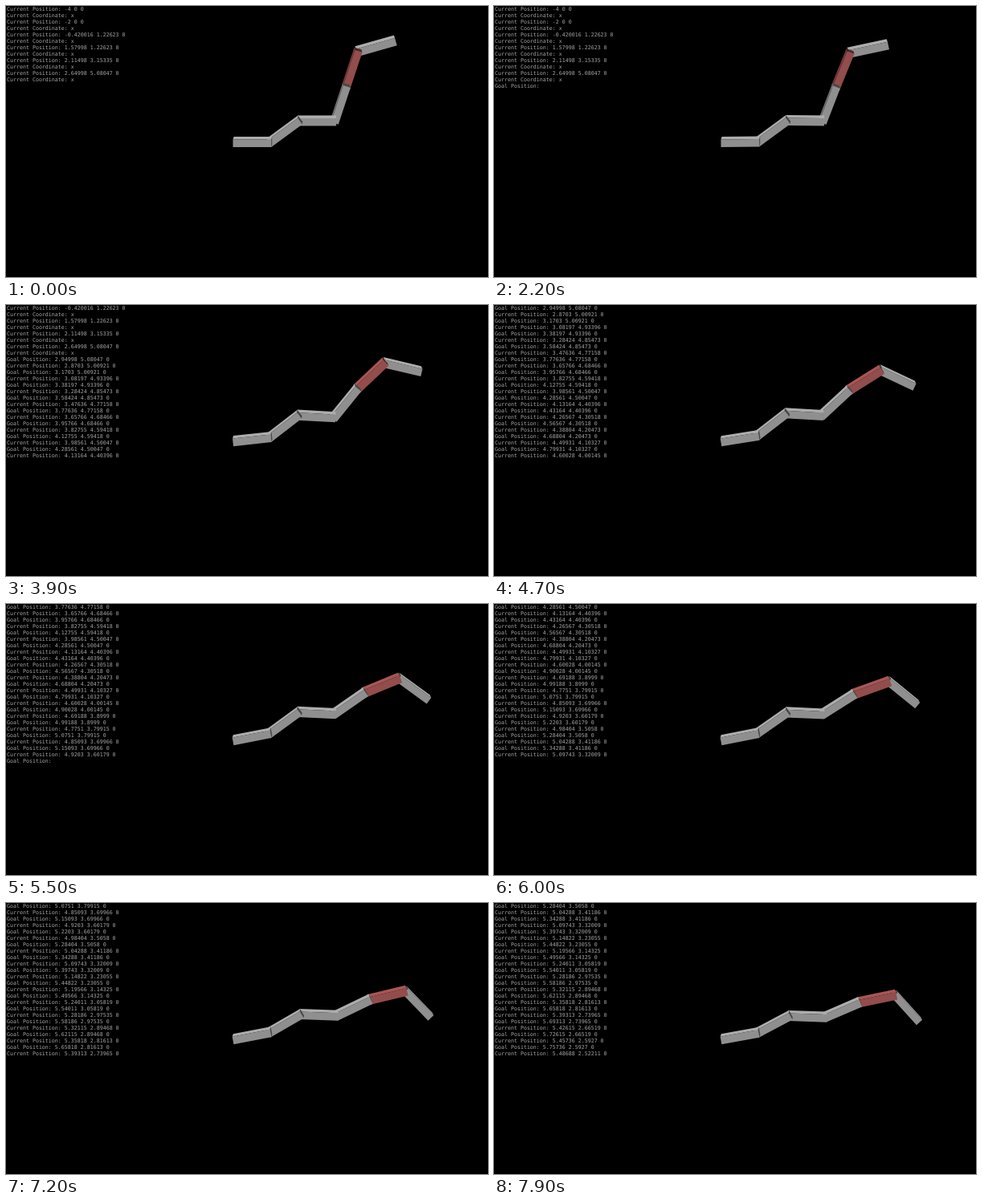
Animation of 600x338 px, one loop 8 s. Source, as an HTML page with a canvas:

```html
<!DOCTYPE html>
<html lang="en">
<head>
<meta charset="utf-8">
<title>Arm reaching for its goal</title>
<style>
html, body { margin: 0; width: 100%; height: 100%; overflow: hidden; background: #000; }
canvas, pre, #cursor { position: absolute; left: 0; top: 0; }
pre {
  margin: 0; left: 1px; color: #a6a6a6;
  font: 6.644px/8px "DejaVu Sans Mono", "Liberation Mono", monospace;
}
#cursor { left: 1.5px; top: 102.5px; width: 4px; height: 1.5px; background: #aaa; }
</style>
</head>
<body>
<canvas id="stage" width="600" height="338"></canvas>
<pre id="log"></pre>
<div id="cursor"></div>
<script>
const LOOP = 8000, ROWS = 25, STEPS = 29, LINK = 2, REACH = 0.3;
const DAMPING = 5.78, GAIN = 0.981;
const ctx = document.getElementById('stage').getContext('2d');
const log = document.getElementById('log');
const cursor = document.getElementById('cursor');

// Forward kinematics: world positions of the joints, then the tip
function jointsOf(bends) {
  let x = -4, y = 0, angle = 0;
  const joints = [[x, y]];
  for (const bend of bends) {
    angle += bend;
    x += LINK * Math.cos(angle);
    y += LINK * Math.sin(angle);
    joints.push([x, y]);
  }
  return joints;
}

// One damped least squares step of the wrist (joint 5) towards +x
function reach(bends) {
  const joints = jointsOf(bends), [wx, wy] = joints[5];
  const arms = joints.slice(0, 5).map(([x, y]) => [wx - x, wy - y]);
  const sum = f => arms.reduce((s, [x, y]) => s + f(x, y), 0);
  const a = sum((x, y) => y * y) + DAMPING;
  const b = sum((x, y) => -x * y);
  const c = sum(x => x * x) + DAMPING;
  const k = GAIN * REACH / (a * c - b * b);
  return bends.map((bend, i) => i < 5 ? bend - arms[i][1] * c * k - arms[i][0] * b * k : bend);
}

const poses = [[0, 0.66, -0.66, 1.3, 0, -1.02]];
while (poses.length <= STEPS) poses.push(reach(poses[poses.length - 1]));

const num = v => String(+v.toPrecision(6));
const place = (name, [x, y]) => `${name} Position: ${num(x)} ${num(y)} 0`;
const lines = jointsOf(poses[0]).slice(0, 6)
  .flatMap(p => [place('Current', p), 'Current Coordinate: x']);
const intro = lines.length;
for (let k = 1; k <= STEPS; k++) {
  const [x, y] = jointsOf(poses[k - 1])[5];
  lines.push(place('Goal', [x + REACH, y]), place('Current', jointsOf(poses[k])[5]));
}

// Solver steps finished at a time; slower at first
function progress(t) {
  const p = t < 3355 ? 1 + (t - 2240) / 279 : 5 + (t - 3355) / 180.5;
  return Math.min(STEPS, Math.max(0, p));
}

// World to stage; higher parts lie nearer to the camera
function project([x, y]) {
  const near = 1 / (1 - 0.0078 * y);
  return [284 + 22.3 * (x + 4) * near, 171.2 - 21.4 * y * near];
}

const grey = { front: '#8f8f8f', top: '#adadad', side: '#6e6e6e', cap: '#484848' };
const red = { front: '#924d4c', top: '#a95655', side: '#703a39', cap: '#4c2827' };

function fill(points, color) {
  ctx.beginPath();
  points.forEach(p => ctx.lineTo(...p));
  ctx.closePath();
  ctx.fillStyle = color;
  ctx.fill();
}

function drawLink(p, q, paint) {
  const half = 4.8, over = 1.5;
  const len = Math.hypot(q[0] - p[0], q[1] - p[1]);
  const ux = (q[0] - p[0]) / len, uy = (q[1] - p[1]) / len;
  const at = (c, along, across) => [
    c[0] + ux * over * along - uy * half * across,
    c[1] + uy * over * along + ux * half * across
  ];
  const front = [at(p, -1, -1), at(q, 1, -1), at(q, 1, 1), at(p, -1, 1)];
  const normals = [[uy, -ux], [ux, uy], [-uy, ux], [-ux, -uy]];
  const dx = (380 - (p[0] + q[0]) / 2) * 0.015, dy = -3.5;
  const back = c => [c[0] + dx, c[1] + dy];
  normals.forEach(([nx, ny], i) => {
    if (nx * dx + ny * dy <= 0) return;
    const a = front[i], b = front[(i + 1) % 4];
    fill([a, b, back(b), back(a)], i % 2 ? paint.cap : ny < -0.5 ? paint.top : paint.side);
  });
  fill(front, paint.front);
}

function drawArm(bends) {
  const points = jointsOf(bends).map(project);
  ctx.clearRect(0, 0, 600, 338);
  for (let i = 5; i >= 0; i--) drawLink(points[i], points[i + 1], i === 4 ? red : grey);
}

function frame(t) {
  const p = progress(t), k = Math.floor(p);
  const goal = p - k > 0.85;
  const count = intro + 2 * k;
  const visible = lines.slice(Math.max(0, count + 1 - ROWS), count);
  if (goal) visible.push('Goal Position:');
  const text = visible.join('\n');
  if (log.textContent !== text) log.textContent = text;
  drawArm(poses[goal ? k + 1 : k]);
  const lit = t < 2200 && (t + 890) % 1060 < 530;
  cursor.style.visibility = lit ? 'visible' : 'hidden';
}

const began = performance.now();
function tick() {
  frame((performance.now() - began) % LOOP);
  requestAnimationFrame(tick);
}
tick();
</script>
</body>
</html>
```
